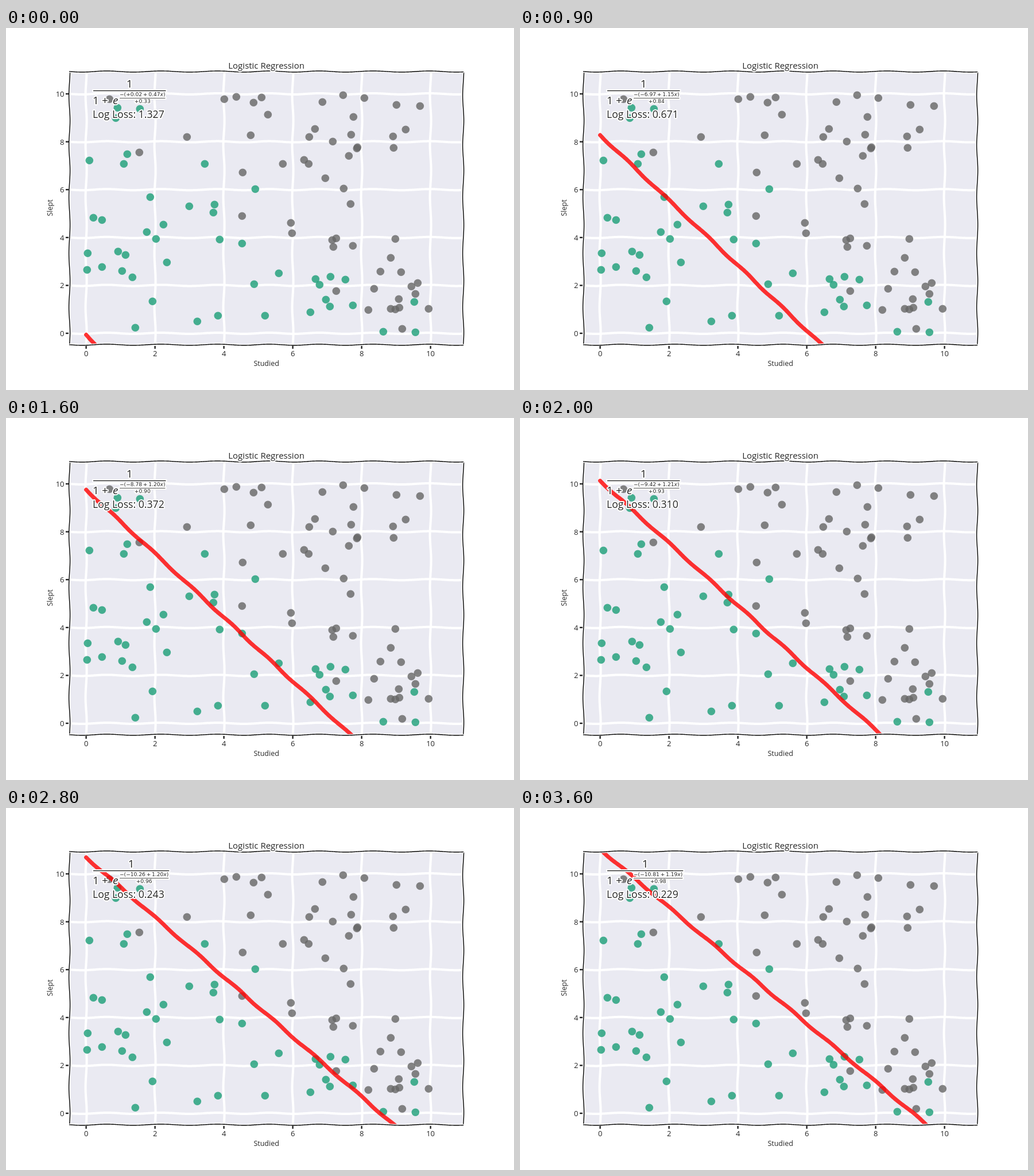
An HTML page with a canvas for the animation above (3700 ms loop, 885 by 632 pixels).

```html
<!DOCTYPE html>
<html lang="en">
<head>
<meta charset="utf-8">
<title>Logistic Regression</title>
<style>
html, body { margin: 0; width: 100%; height: 100%; overflow: hidden; background: #fff; }
canvas { display: block; }
</style>
</head>
<body>
<canvas id="stage" width="885" height="632"></canvas>
<script>
const ctx = document.getElementById('stage').getContext('2d');
const STEP = 100, STEPS = 37;
const BOX = { l: 110.6, r: 796.6, t: 76, b: 553 };
const HAND = '"Open Sans", "Noto Sans", sans-serif';
const MATH = '"DejaVu Sans", sans-serif';
const INK = '#262626';
const px = x => 139.6 + 60 * x;
const py = y => 533 - 41.8 * y;

const green = [
  145,231, 205,237, 211,220, 194,139, 191,157, 233,141, 251,295, 152,331, 167,335,
  245,356, 274,343, 261,368, 142,393, 141,422, 167,417, 195,390, 208,396, 202,424,
  220,435, 280,409, 255,477, 225,523, 346,237, 319,311, 363,308, 361,322, 372,369,
  411,376, 434,281, 432,447, 475,428, 333,512, 369,502, 451,502, 530,496, 539,438,
  546,448, 565,434, 591,439, 557,474, 564,486, 604,484, 657,530, 713,531, 711,478];
const grey = [
  180,124, 232,217, 315,190, 380,124, 401,120, 431,130, 445,121, 456,151, 426,187,
  412,252, 411,328, 482,237, 496,340, 498,358, 519,230, 527,237, 528,190, 538,176,
  551,129, 587,117, 624,122, 605,155, 601,186, 569,198, 597,223, 611,210, 612,208,
  556,262, 588,280, 600,307, 575,367, 568,370, 570,382, 604,380, 575,459, 631,492,
  641,455, 652,425, 670,401, 678,368, 680,134, 721,136, 696,177, 674,189, 675,209,
  688,426, 717,445, 706,451, 713,464, 684,473, 670,490, 678,491, 685,488, 690,525,
  736,490];

// Training progress at selected steps.
const at = [0, 5, 12, 16, 20, 28, 36];
const bias = curve([0.02, -5.16, -7.89, -8.78, -9.42, -10.26, -10.81]);
const wx = curve([0.47, 1.09, 1.17, 1.20, 1.21, 1.20, 1.19]);
const wy = curve([0.33, 0.81, 0.86, 0.90, 0.93, 0.96, 0.98]);
const loss = curve([1.327, 1.012, 0.474, 0.372, 0.310, 0.243, 0.229]);

// Monotone cubic interpolation.
function curve(v) {
  const n = at.length;
  const h = at.slice(1).map((a, i) => a - at[i]);
  const d = h.map((w, i) => (v[i + 1] - v[i]) / w);
  const end = (i, j) => ((2 * h[i] + h[j]) * d[i] - h[i] * d[j]) / (h[i] + h[j]);
  const m = v.map((_, i) => {
    if (i === 0) return end(0, 1);
    if (i === n - 1) return end(n - 2, n - 3);
    if (d[i - 1] * d[i] <= 0) return 0;
    const a = 2 * h[i] + h[i - 1], b = h[i] + 2 * h[i - 1];
    return (a + b) / (a / d[i - 1] + b / d[i]);
  });
  return t => {
    let i = 0;
    while (i < n - 2 && t >= at[i + 1]) i++;
    const u = (t - at[i]) / h[i], w = 1 - u;
    return v[i] * (1 + 2 * u) * w * w + v[i + 1] * u * u * (3 - 2 * u)
      + h[i] * (m[i] * u * w * w - m[i + 1] * u * u * w);
  };
}

// Straight line with a hand-drawn sideways wave.
function sketch(x0, y0, x1, y1, color, width) {
  const len = Math.hypot(x1 - x0, y1 - y0);
  const ux = (x1 - x0) / len, uy = (y1 - y0) / len;
  ctx.beginPath();
  for (let s = 0; s <= len; s += 2) {
    const r = Math.sin(s / 14.7 + 0.3 * Math.sin(s / 60));
    ctx.lineTo(x0 + ux * s - uy * r, y0 + uy * s + ux * r);
  }
  ctx.strokeStyle = color;
  ctx.lineWidth = width;
  ctx.stroke();
}

function bar(x0, x1, y, width, color) {
  ctx.fillStyle = color;
  ctx.fillRect(x0, y - width / 2, x1 - x0, width);
}

// Text pieces are [string, x, baseline, font, align]; all halos go below all letters.
function label(pieces) {
  ctx.lineWidth = 4;
  ctx.strokeStyle = '#fff';
  for (const paint of ['strokeText', 'fillText']) {
    for (const [str, x, y, font, align] of pieces) {
      ctx.font = font;
      ctx.textAlign = align || 'left';
      ctx.fillStyle = INK;
      ctx[paint](str, x, y);
    }
  }
}

function dots(list, color) {
  ctx.fillStyle = color;
  for (let i = 0; i < list.length; i += 2) {
    ctx.beginPath();
    ctx.arc(list[i] + 0.3, list[i + 1] + 0.3, 6.8, 0, 2 * Math.PI);
    ctx.fill();
  }
}

function axes() {
  const { l, r, t, b } = BOX;
  const edges = [[l, b, l, t], [r, b, r, t], [l, b, r, b], [l, t, r, t]];
  for (const e of edges) {
    sketch(...e, '#fff', 4);
    sketch(...e, '#000', 1.4);
  }
  const tick = '13px ' + HAND;
  const texts = [
    ['Logistic Regression', 453.6, 71, '15px ' + HAND, 'center'],
    ['Studied', 453.6, 590, '12.5px ' + HAND, 'center']];
  for (let v = 0; v <= 10; v += 2) {
    ctx.fillStyle = INK;
    ctx.fillRect(px(v) - 1.2, 555, 2.4, 5);
    ctx.fillRect(104, py(v) - 1.2, 5, 2.4);
    texts.push([v, px(v), 573, tick, 'center'], [v, 101.5, py(v) + 5, tick, 'right']);
  }
  label(texts);
  ctx.save();
  ctx.translate(81, 314);
  ctx.rotate(-Math.PI / 2);
  label([['Slept', 0, 0, '12.5px ' + HAND, 'center']]);
  ctx.restore();
}

const signed = v => (v < 0 ? '\u2212' : '+') + Math.abs(v).toFixed(2);

function formula(k) {
  const small = '9.1px ' + MATH, big = '19px ' + HAND, slant = 'italic ';
  const head = `\u2212(${signed(bias(k))}\u2009+\u2009${wx(k).toFixed(2)}`;
  ctx.font = small;
  const xVar = 198 + ctx.measureText(head).width;
  ctx.font = slant + small;
  const xEnd = xVar + ctx.measureText('x').width;
  ctx.font = small;
  const right = xEnd + ctx.measureText(')').width;
  bar(150, right + 3, 109.5, 5, '#fff');
  bar(196, right + 2, 122.5, 5, '#fff');
  label([
    ['1', (153 + right) / 2, 104, big, 'center'],
    ['1', 151, 133, big], ['+', 167, 133, big], ['e', 186, 133, slant + big],
    [head, 198, 118.5, small], ['x', xVar, 118.5, slant + small], [')', xEnd, 118.5, small],
    [signed(wy(k)), (198 + right) / 2, 131, small, 'center'],
    ['Log Loss: ' + loss(k).toFixed(3), 151, 157, '17.6px ' + HAND]]);
  bar(152, right + 1, 109.5, 1.4, INK);
  bar(198, right, 122.5, 0.8, INK);
}

function draw(k) {
  const { l, r, t, b } = BOX;
  ctx.fillStyle = '#fff';
  ctx.fillRect(0, 0, 885, 632);
  ctx.save();
  ctx.beginPath();
  ctx.rect(l, t, r - l, b - t);
  ctx.clip();
  ctx.fillStyle = '#eaeaf2';
  ctx.fillRect(l, t, r - l, b - t);
  for (let v = 0; v <= 10; v += 2) {
    sketch(px(v), b, px(v), t, '#fff', 4);
    sketch(l, py(v), r, py(v), '#fff', 4);
  }
  dots(grey, 'rgba(102,102,102,.8)');
  dots(green, 'rgba(27,158,119,.8)');
  const boundary = x => py(-(bias(k) + wx(k) * x) / wy(k));
  sketch(px(0), boundary(0), px(10), boundary(10), 'rgba(255,0,0,.8)', 7);
  ctx.restore();
  axes();
  formula(k);
}

ctx.lineCap = ctx.lineJoin = 'round';
const start = performance.now();
function tick() {
  draw(Math.floor((performance.now() - start) / STEP) % STEPS);
  requestAnimationFrame(tick);
}
tick();
</script>
</body>
</html>
```
